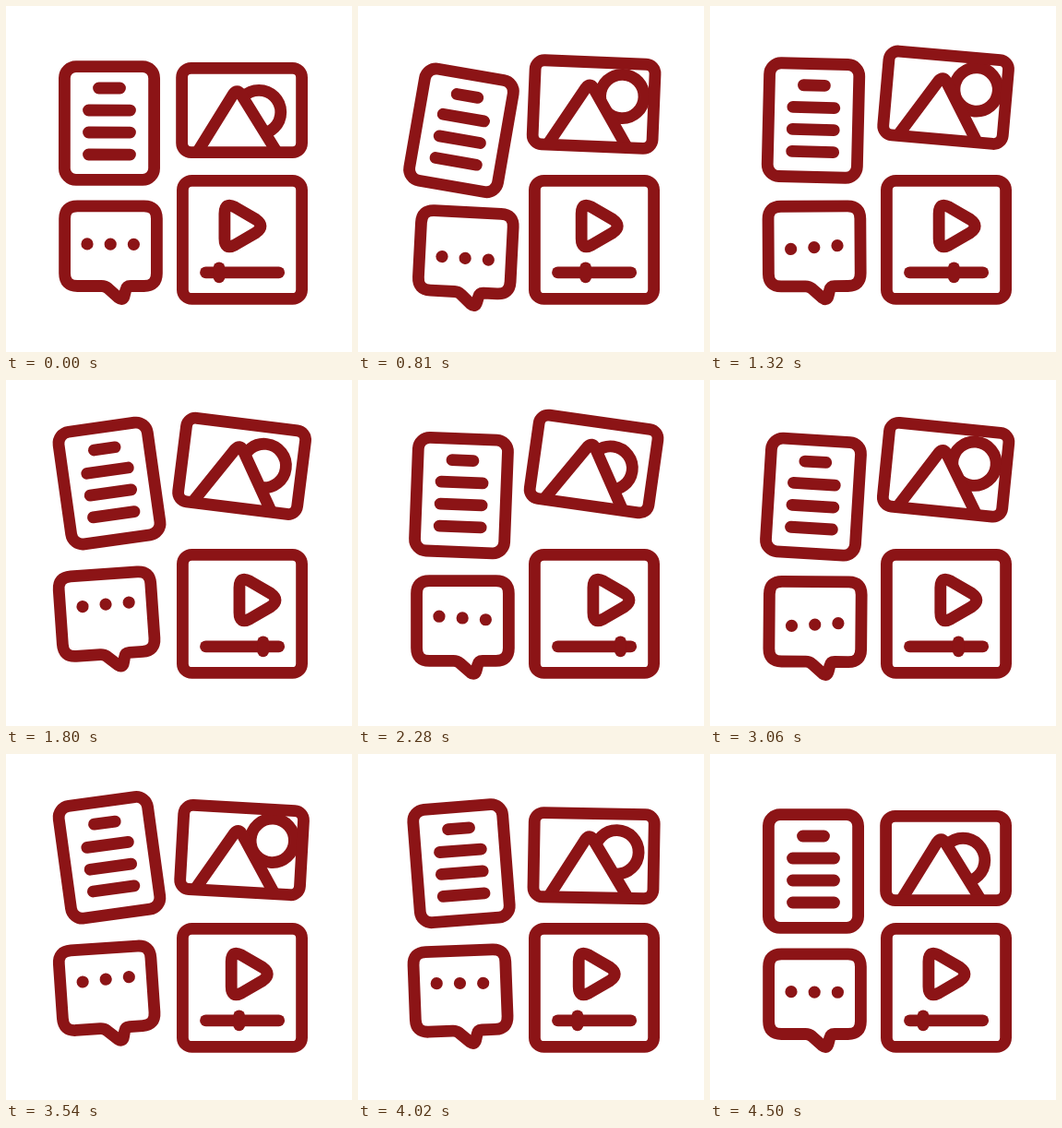
These frames come from a looping animation (375 px wide and 375 px high, 4.53 s). An HTML page:

```html
<!DOCTYPE html>
<html lang="en">
<head>
<meta charset="utf-8">
<title>Content icons</title>
<style>
  html, body { margin: 0; width: 100%; height: 100%; overflow: hidden; background: #fff; }
  svg { display: block; width: 100vw; height: 100vh; }
  .ink { fill: none; stroke: #8c1416; stroke-width: 12.8; stroke-linecap: round; stroke-linejoin: round; }
  .dot { fill: #8c1416; stroke: none; }
</style>
</head>
<body>
<svg viewBox="0 0 375 375">
  <g class="ink">
    <g id="page">
      <rect x="-48.6" y="-61.4" width="97.2" height="122.8" rx="12.5"/>
      <path d="M-11.5-38h23M-22.5-14h45M-22.5 10h45M-22.5 34h45"/>
    </g>

    <g id="photo">
      <circle id="sun" cx="18.5" cy="2" r="23.7"/>
      <path d="M-48.3 45.5L-9.3-17.5Q-5-23.2-1-17.5L38 45.5" fill="#fff" stroke-linecap="butt"/>
      <rect x="-65" y="-45.6" width="130" height="91.2" rx="10"/>
    </g>

    <g id="bubble">
      <path d="M77.4 216.8H149.6Q163.4 216.8 163.4 230.6V289.7Q163.4 303.5 149.6 303.5H135Q130.7 303.5 129.7 308L128.4 313.3Q127 320 122 316.2L110.5 306Q107.5 303.5 103.5 303.5H77.4Q63.6 303.5 63.6 289.7V230.6Q63.6 216.8 77.4 216.8Z"/>
      <circle class="dot" cx="88" cy="258.3" r="6.6"/>
      <circle class="dot" cx="113.2" cy="258.3" r="6.6"/>
      <circle class="dot" cx="138.4" cy="258.3" r="6.6"/>
    </g>

    <rect x="191.4" y="189.4" width="129.2" height="128" rx="10"/>
    <path id="play" d="M236.9 225Q236.9 212 248 218L271 231.4Q281 238.5 271 245.6L248 259Q236.9 265 236.9 252Z"/>
    <path d="M216.5 288.8H295.7"/>
    <path id="knob" d="M231 283.8V293.8"/>
  </g>
</svg>
<script>
  const LOOP = 4530, HALF = LOOP / 2, SWING = LOOP / 5, LEAD = 25;
  const get = id => document.getElementById(id);
  const move = (el, value) => el.setAttribute('transform', value);
  const ease = u => u * u * (3 - 2 * u);
  const [page, photo, sun, bubble, play, knob] =
    ['page', 'photo', 'sun', 'bubble', 'play', 'knob'].map(get);
  const dots = document.querySelectorAll('.dot');

  // Out and back once per period, 0 to 1 to 0.
  const pulse = (t, period) => ease(1 - Math.abs(2 * (t % period) / period - 1));

  // Five eased stretches: rest, high, low, high, low, rest.
  function sway(t, high, low) {
    const stops = [0, high, low, high, low, 0];
    const at = ((t + LEAD + LOOP) % LOOP) / SWING, i = Math.floor(at);
    return stops[i] + (stops[i + 1] - stops[i]) * ease(at - i);
  }

  function draw(t) {
    const trip = pulse(t, LOOP), rise = pulse(t, HALF);
    move(page, `translate(112 ${127 + sway(t, 8, -15)}) rotate(${sway(t, 10, -8)})`);
    move(photo, `translate(255.6 ${113 - 22 * trip}) rotate(${8 * trip})`);
    move(sun, `translate(${14.7 * rise} ${-14.7 * rise})`);
    move(bubble, `translate(0 ${sway(t, 7.2, -7.5)}) rotate(${sway(t, 3, -4)} 125 324)`);
    dots.forEach((dot, i) => move(dot, `translate(0 ${sway(t - LEAD - 60 * (2 - i), 9.3, -9)})`));
    move(play, `translate(${18 * trip} 0)`);
    move(knob, `translate(${53.5 * trip} 0)`);
  }

  function tick() {
    draw(performance.now() % LOOP);
    requestAnimationFrame(tick);
  }
  tick();
</script>
</body>
</html>
```
